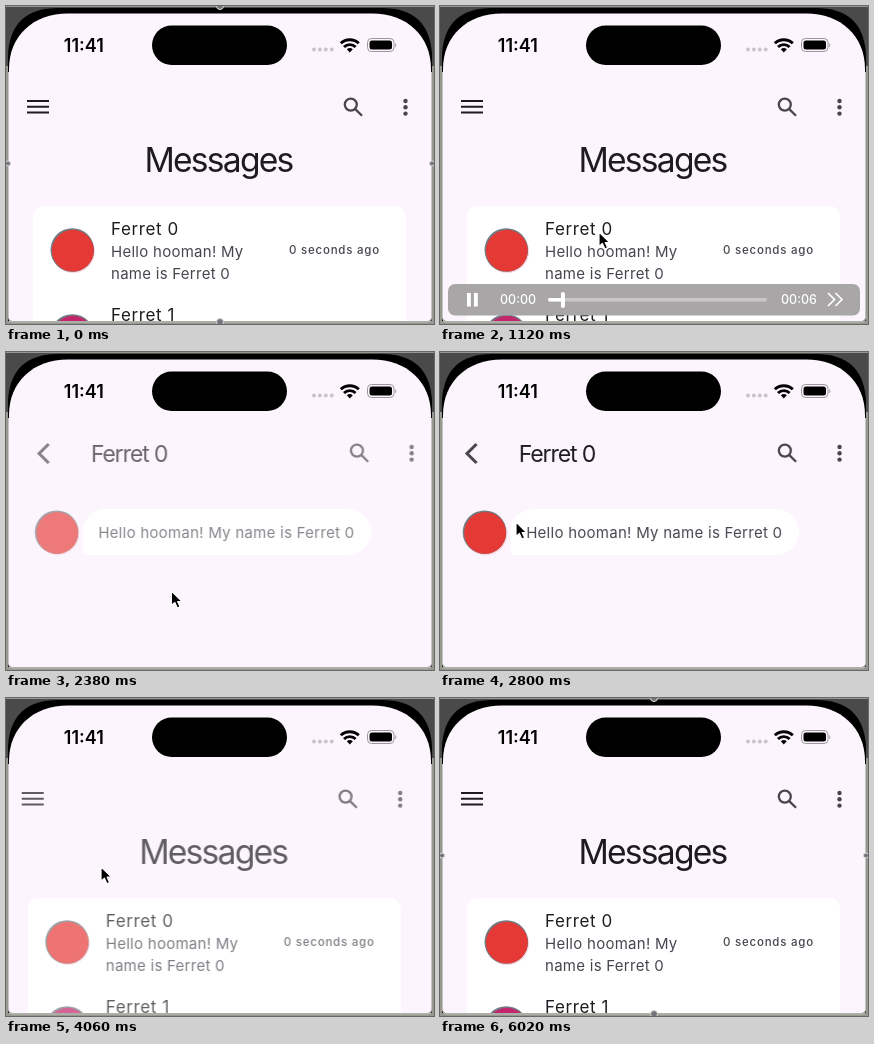
Recreate the animation shown at these times as an HTML page. Size 428 by 318 pixels, loop 6.65 s.

```html
<!DOCTYPE html>
<html lang="en">
<head>
<meta charset="utf-8">
<title>Messages</title>
<style>
  html, body { margin: 0; width: 100%; height: 100%; overflow: hidden; background: #000; }
  svg { display: block; width: 100vw; height: 100vh; }
  text { font-family: Inter, Roboto, sans-serif; font-optical-sizing: none; white-space: pre; }
  .heading { font-size: 33.6px; letter-spacing: -1.75px; fill: #1d1b20; text-anchor: middle; }
  .name { font-size: 17px; letter-spacing: .6px; fill: #1d1b20; }
  .body { font-size: 15px; letter-spacing: .27px; fill: #49454f; }
  .ago { font-size: 11.5px; font-weight: 500; letter-spacing: .77px; fill: #49454f; }
  .title { font-size: 23px; letter-spacing: -1.1px; fill: #1d1b20; }
  .clock { font-size: 18px; font-weight: 600; fill: #000; }
  .time { font-size: 12.5px; font-weight: 500; fill: #fff; }
  .line { fill: none; stroke: #49454f; }
  /* Paper settles sooner than the content on it. */
  .content { opacity: var(--fade); }
  .paper { fill: #fff; opacity: calc(var(--fade) * 1.6); }
</style>
</head>
<body>
<svg viewBox="0 0 428 318" preserveAspectRatio="none">
  <defs>
    <path id="screen" d="M3 63C3 30 27 7.500 62 7.500H366C401 7.500 425 30 425 63V312Q425 315 422 315H6Q3 315 3 312Z"/>
    <clipPath id="inside"><use href="#screen"/></clipPath>
    <g id="actions">
      <g class="line" stroke-width="2.3">
        <circle cx="344.8" cy="98.6" r="6"/>
        <path d="M349.3 103.1L356 109.8"/>
      </g>
      <g fill="#49454f">
        <circle cx="399.5" cy="95" r="2.2"/>
        <circle cx="399.5" cy="101.3" r="2.2"/>
        <circle cx="399.5" cy="107.6" r="2.2"/>
      </g>
    </g>
    <g id="avatar">
      <circle cx="1" cy="1.4" r="21.8" fill="#f5dbe3"/>
      <circle r="21.8" fill="#717982"/>
      <circle cx=".6" cy=".7" r="20.9" fill="currentColor"/>
    </g>
  </defs>

  <!-- device frame -->
  <rect width="428" height="318" fill="#979890"/>
  <path d="M0 60V1H428V60Z" fill="#4a4a4a"/>
  <path d="M2 315V48Q5 2 52 2H376Q423 2 426 48V315Z" fill="#000"/>
  <path d="M2.500 66V312Q3 316 6 316H422Q425.500 316 425.500 312V66" fill="none" stroke="#c4c3c0"/>
  <use href="#screen" fill="#fcf5fd"/>

  <g clip-path="url(#inside)">
    <g id="list">
      <rect class="paper" x="27" y="200" width="373" height="140" rx="11"/>
      <g class="content">
        <path d="M21 95H43M21 100.700H43M21 106.400H43" class="line" stroke-width="2" style="stroke:#1d1b20"/>
        <use href="#actions"/>
        <text class="heading" x="212.500" y="165.500">Messages</text>
        <use href="#avatar" x="66.300" y="244" color="#e53935"/>
        <text class="name" x="105" y="229">Ferret 0</text>
        <text class="body" x="105" y="251">Hello hooman! My</text>
        <text class="body" x="105" y="273">name is Ferret 0</text>
        <text class="ago" x="283" y="248">0 seconds ago</text>
        <use href="#avatar" x="66.300" y="330" color="#c2256b"/>
        <text class="name" x="105" y="314.500">Ferret 1</text>
      </g>
    </g>

    <g id="detail">
      <path class="paper" d="M70.500 199V180A23 23 0 0 1 93.500 157H336A23 23 0 0 1 336 203H74.500Q70.500 203 70.500 199Z"/>
      <g class="content">
        <circle id="ripple" cx="32" cy="107" r="16" fill="#1d1b20" fill-opacity=".1"/>
        <path d="M36.500 92L27 101.500L36.500 111" class="line" stroke-width="3.100"/>
        <text class="title" x="78.700" y="110">Ferret 0</text>
        <use href="#actions"/>
        <use href="#avatar" x="44.500" y="180.200" color="#e53935"/>
        <text class="body" x="86.200" y="185.500">Hello hooman! My name is Ferret 0</text>
      </g>
    </g>
  </g>

  <!-- status bar -->
  <rect x="146" y="19.500" width="135" height="39.500" rx="19.700"/>
  <text class="clock" x="57.800" y="46">11:41</text>
  <path d="M308 43.500H326" stroke="#c9c4cc" stroke-width="4" stroke-linecap="round" stroke-dasharray="0 5.900"/>
  <g fill="none" stroke="#000" stroke-width="2.900">
    <path d="M334.800 37.300A13 13 0 0 1 352.800 37.300"/>
    <path d="M338 41A8.300 8.300 0 0 1 349.600 41"/>
  </g>
  <path d="M340.800 43.300A4.500 4.500 0 0 1 346.800 43.300L343.800 46.500Z"/>
  <rect x="361.500" y="32.500" width="26.500" height="13" rx="4" fill="none" stroke="#9a969c"/>
  <rect x="363.500" y="34.500" width="22.500" height="9" rx="2.500"/>
  <path d="M389.300 37Q391.500 39 389.300 41.500Z" fill="#9a969c"/>

  <g id="handles" fill="#74747a" stroke="#d8d8d8">
    <circle cx="214" cy="0" r="3.500"/>
    <circle cx="214" cy="316" r="3.500"/>
    <circle cx="2" cy="157.500" r="2.500"/>
    <circle cx="426" cy="157.500" r="2.500"/>
  </g>

  <!-- player controls -->
  <g id="player">
    <rect x="8" y="278" width="412" height="31.500" rx="7" fill="#a8a6a7"/>
    <path id="play" d="M27 286.500L39 293.500L27 300.500Z" fill="#fff"/>
    <path id="pause" d="M27 287h3.800v13.500h-3.800zM34 287h3.800v13.500h-3.800z" fill="#fff"/>
    <text id="elapsed" class="time" x="60" y="298">00:00</text>
    <rect x="108" y="292" width="219" height="3.500" rx="1.700" fill="#c9c7c8"/>
    <rect id="played" x="108" y="292" height="3.500" rx="1.700" fill="#fff"/>
    <rect id="knob" y="286" width="4" height="16" rx="2" fill="#fff"/>
    <text class="time" x="341" y="298">00:06</text>
    <path d="M388 287L394.500 293.500L388 300M395.500 287L402 293.500L395.500 300" fill="none" stroke="#fff" stroke-width="1.700"/>
  </g>

  <path id="cursor" d="M0 0V14.500L3.400 11.500L5.900 17L8.600 15.800L6.200 10.500H10.700Z"
        stroke="#fff" stroke-width="1.200" stroke-linejoin="round"/>
</svg>

<script>
  const LOOP = 6650, STEP = 70, PLAY_AT = 770, VIDEO = 5500;
  const PUSH_AT = 1885, POP_AT = 3540, SLIDE_MS = 960, SLIDE_PX = 30;
  const cursorPath = [
    [770, 216, 320], [980, 170, 242], [1120, 159, 226], [1820, 159, 226],
    [2380, 165.4, 239], [2520, 165.4, 239], [2800, 76, 170], [3080, 27, 111],
    [3220, 27, 111], [3430, 31, 108], [3640, 31, 108], [4060, 95, 168.7], [4620, 216, 322]
  ];

  const $ = id => document.getElementById(id);
  const clamp = v => Math.min(1, Math.max(0, v));
  const ramp = (t, from, ms) => clamp((t - from) / ms);
  const show = (id, on) => $(id).setAttribute("opacity", Number(on));
  const move = (id, x, y) => $(id).setAttribute("transform", `translate(${x} ${y})`);

  // Cubic bezier easing, solved by bisection.
  function bezier(x1, y1, x2, y2) {
    const at = (a, b, s) => 3 * a * s * (1 - s) ** 2 + 3 * b * s * s * (1 - s) + s ** 3;
    return x => {
      x = clamp(x);
      if (x === 0 || x === 1) return x;
      let lo = 0, hi = 1;
      for (let i = 0; i < 24; i++) {
        const mid = (lo + hi) / 2;
        if (at(x1, x2, mid) < x) lo = mid; else hi = mid;
      }
      return at(y1, y2, lo);
    };
  }
  const standard = bezier(.4, 0, .2, 1);
  const accelerate = bezier(.4, 0, 1, 1);
  const decelerate = bezier(0, 0, .2, 1);

  function place(id, shift, fade) {
    move(id, SLIDE_PX * shift, 0);
    $(id).style.setProperty("--fade", fade.toFixed(4));
  }
  const leave = (id, side, p) => place(id, side * standard(p), 1 - accelerate(p / .3));
  const enter = (id, side, p) => place(id, side * (1 - standard(p)), decelerate((p - .3) / .7));

  function drawPages(t) {
    if (t < POP_AT) {
      const p = ramp(t, PUSH_AT, SLIDE_MS);
      leave("list", -1, p);
      enter("detail", 1, p);
    } else {
      const p = ramp(t, POP_AT, SLIDE_MS);
      leave("detail", 1, p);
      enter("list", -1, p);
    }
    show("ripple", t >= 3640);
  }

  function drawPlayer(t) {
    const playing = t >= PLAY_AT;
    const x = 108 + 219 * ramp(t, PLAY_AT, VIDEO);
    show("player", ramp(t, 0, 210) * (1 - ramp(t, 1540, 210)));
    show("play", !playing);
    show("pause", playing);
    $("played").setAttribute("width", x - 108);
    $("knob").setAttribute("x", x - 1);
    $("elapsed").textContent = "00:0" + Math.floor(Math.max(0, t - PLAY_AT) / 1000);
    show("handles", playing ? ramp(t, 5460, 140) : 1);
  }

  function drawCursor(t) {
    const i = cursorPath.findIndex(k => k[0] > t);
    show("cursor", i > 0);
    if (i < 1) return;
    const [t0, x0, y0] = cursorPath[i - 1], [t1, x1, y1] = cursorPath[i];
    const p = (t - t0) / (t1 - t0);
    move("cursor", x0 + (x1 - x0) * p, y0 + (y1 - y0) * p);
  }

  const start = performance.now();
  function frame() {
    const now = Math.max(0, performance.now() - start) % LOOP;
    const t = Math.floor(now / STEP) * STEP;
    drawPages(t);
    drawPlayer(t);
    drawCursor(t);
    requestAnimationFrame(frame);
  }
  frame();
</script>
</body>
</html>
```
